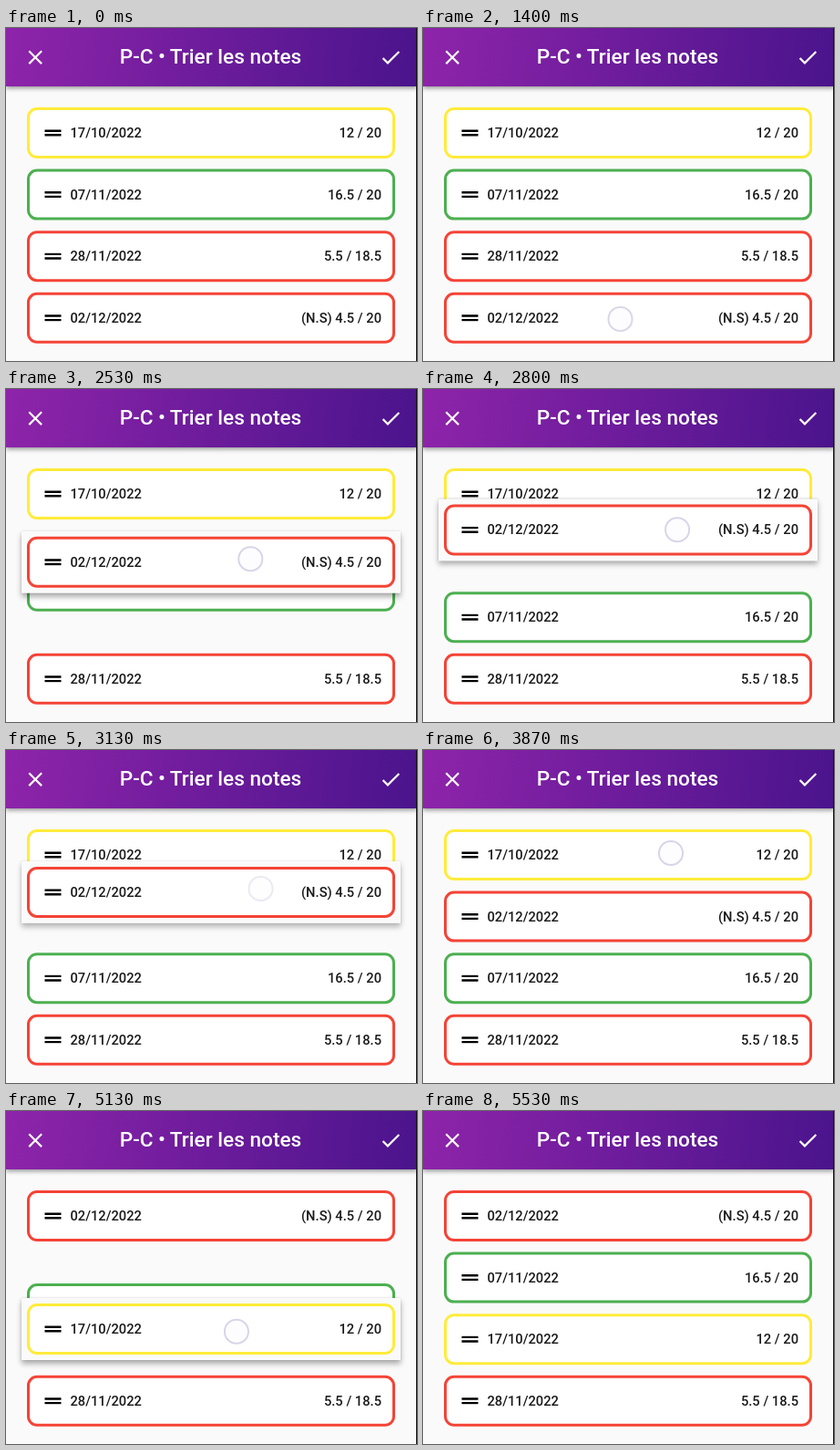
These frames come from a looping animation (451 px wide and 365 px high, 6470 ms). An HTML page:

```html
<!DOCTYPE html>
<html lang="fr">
<head>
<meta charset="utf-8">
<title>Trier les notes</title>
<style>
  html, body { margin: 0; width: 100%; height: 100%; overflow: hidden; background: #fafafa; }
  body { position: relative; font-family: Roboto, "Open Sans", sans-serif; font-weight: 500; }

  header {
    position: absolute; left: 0; top: 0; z-index: 5; width: 451px; height: 64px;
    background: linear-gradient(98deg, #8e24aa, #4a148c);
    box-shadow: 0 2px 5px rgba(0,0,0,.42);
    color: #fff; font-size: 22.6px; line-height: 64px; text-align: center;
  }
  header span { position: relative; left: -1px; }
  header svg { position: absolute; top: 18.8px; width: 26.4px; height: 26.4px; fill: #fff; }
  .close { left: 18.8px; }
  .check { left: 409.2px; }
  .edge { position: absolute; z-index: 6; left: 450px; top: 0; width: 1px; height: 365px; background: #111; }

  .row { position: absolute; left: 17px; top: 81px; width: 416px; height: 67.6px; }
  .row.held {
    z-index: 2; background: #fafafa;
    box-shadow: 0 4px 6px rgba(0,0,0,calc(.32 * var(--lift))), 0 0 2px rgba(0,0,0,calc(.14 * var(--lift)));
  }
  .card {
    position: absolute; left: 5.5px; top: 5.6px; box-sizing: border-box; width: 404px; height: 56px;
    border: 3px solid; border-radius: 11px; background: #fff;
  }
  .card svg { position: absolute; left: 16px; top: 21px; width: 20px; height: 8px; }
  .card span { position: absolute; top: 0; color: #1a1a1a; font-size: 14.7px; line-height: 50px; white-space: pre; }
  .date { left: 45px; }
  .note { right: 11.5px; }

  #touch {
    position: absolute; z-index: 4; left: -13.8px; top: -13.8px; box-sizing: border-box;
    width: 27.6px; height: 27.6px; border: 2px solid #d8d5e8; border-radius: 50%;
    background: rgba(253,253,255,.8);
  }
</style>
</head>
<body>
<header>
  <svg class="close" viewBox="0 0 24 24"><path d="M19 6.41L17.59 5 12 10.59 6.41 5 5 6.41 10.59 12 5 17.59 6.41 19 12 13.41 17.59 19 19 17.59 13.41 12z"/></svg>
  <span>P-C • Trier les notes</span>
  <svg class="check" viewBox="0 0 24 24"><path d="M9 16.17L4.83 12l-1.42 1.41L9 19 21 7l-1.41-1.41z"/></svg>
</header>
<main></main>
<div id="touch"></div>
<div class="edge"></div>
<script>
const LOOP = 6470, STEP = 1000 / 15, PITCH = 67.6;
const LAG = 25; // the row trails the finger by this many ms
const YELLOW = '#ffeb3b', GREEN = '#4caf50', RED = '#f44336';

const ramp = (t, start, length) => Math.min(1, Math.max(0, (t - start) / length));
const smooth = x => x * x * (3 - 2 * x);
const sineOut = x => Math.sin(x * Math.PI / 2);
const slide = (t, start) => smooth(ramp(t, start, 250));

const up = {
  press: 1334, lift: 2000, start: 2055, length: 860, drop: 3070,
  ease: sineOut, x: 216.5, y: 319, dx: 63, dy: -167, target: -2 * PITCH
};
const down = {
  press: 3700, lift: 4320, start: 4600, length: 670, drop: 5270,
  ease: smooth, x: 272, y: 113, dx: -20, dy: 139, target: 2 * PITCH
};

const progress = (t, d) => d.ease(ramp(t, d.start, d.length));

// Follows the finger, then settles into its slot.
function dragOffset(t, d) {
  const y = d.dy * progress(t, d);
  return y + (d.target - y) * slide(t, d.drop);
}

const rows = [
  { date: '17/10/2022', note: '12 / 20', color: YELLOW, drag: down,
    y: t => dragOffset(t, down) },
  { date: '07/11/2022', note: '16.5 / 20', color: GREEN,
    y: t => PITCH * (1 + slide(t, 2410) - slide(t, 5010)) },
  { date: '28/11/2022', note: '5.5 / 18.5', color: RED,
    y: t => PITCH * (2 + slide(t, 2215)) },
  { date: '02/12/2022', note: '(N.S) 4.5 / 20', color: RED, drag: up,
    y: t => PITCH * (3 - slide(t, 4815)) + dragOffset(t, up) }
];

const list = document.querySelector('main');
const touch = document.getElementById('touch');

for (const row of rows) {
  row.el = document.createElement('div');
  row.el.className = 'row';
  row.el.innerHTML = `<div class="card" style="border-color:${row.color}">
    <svg><path d="M.5 .5h18v2.4h-18zM.5 5.1h18v2.4h-18z"/></svg>
    <span class="date">${row.date}</span><span class="note">${row.note}</span></div>`;
  list.append(row.el);
}

function draw(t) {
  for (const { el, drag, y } of rows) {
    el.style.transform = `translateY(${y(t).toFixed(2)}px)`;
    if (!drag) continue;
    el.classList.toggle('held', t > drag.lift && t < drag.drop + 250);
    el.style.setProperty('--lift', slide(t, drag.lift) - slide(t, drag.drop));
  }
  const d = t < 3500 ? up : down;
  const x = d.x + d.dx * progress(t + 2 * LAG, d);
  const y = d.y + d.dy * progress(t + LAG, d);
  touch.style.opacity = ramp(t, d.press, 70) - ramp(t, d.drop, 130);
  touch.style.transform = `translate(${x}px, ${y}px)`;
}

// The picture advances 15 times a second.
let start;
function tick(now) {
  start ??= now;
  const t = (now - start) % LOOP;
  draw(Math.floor((t + 5) / STEP) * STEP);
  requestAnimationFrame(tick);
}
draw(0);
requestAnimationFrame(tick);
</script>
</body>
</html>
```
